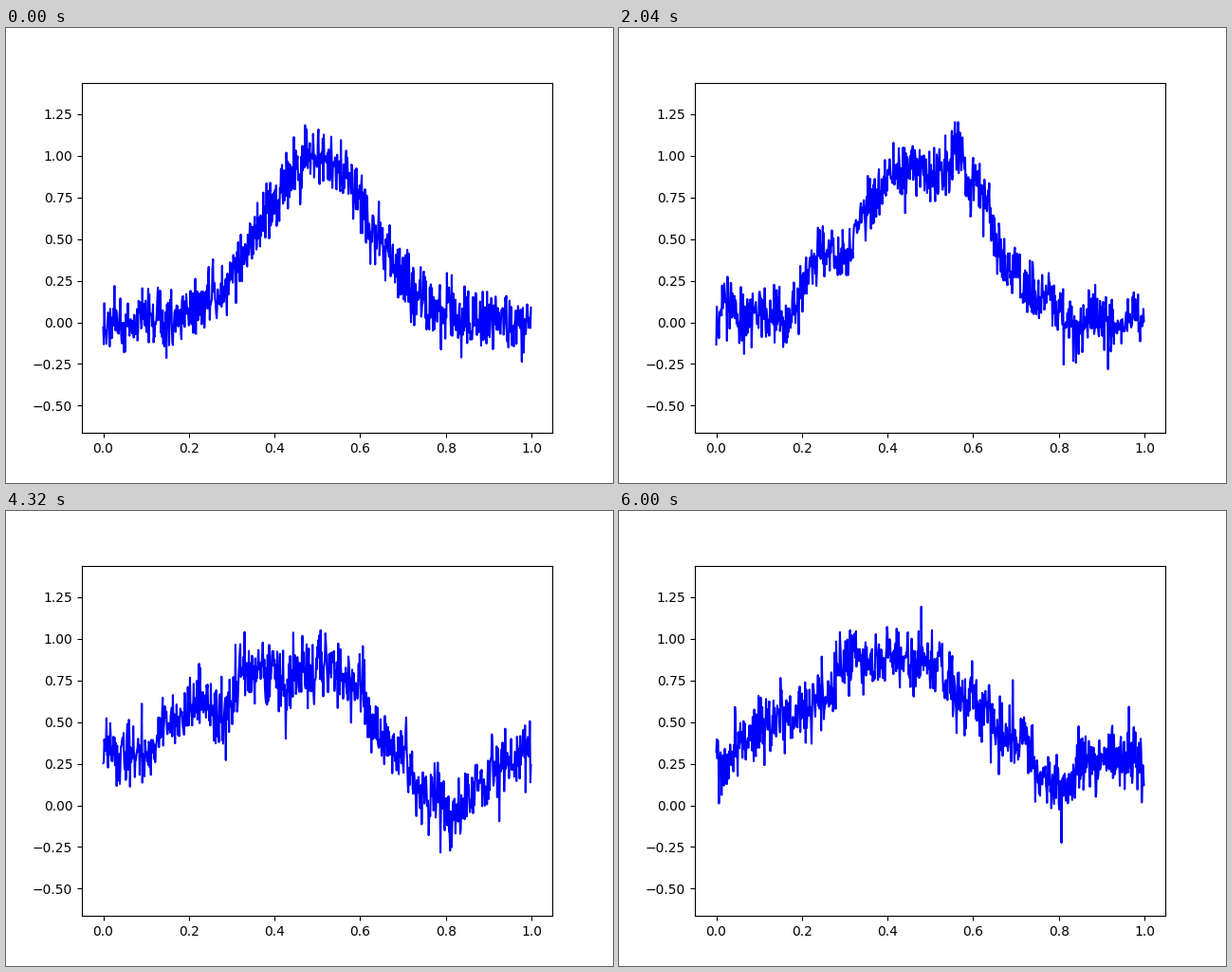
Recreate the animation shown at these times as a matplotlib script. Size 640x480 px, loop 6060 ms.

```python
import numpy as np
import matplotlib.pyplot as plt
from matplotlib.animation import FuncAnimation

FRAMES, STEP_MS, POINTS = 101, 60, 800
SIGMA = 0.125    # width of the starting bell
NOISE = 0.095    # white measurement noise
RIPPLE = 0.12    # strength of the random waves

x = np.arange(POINTS) / POINTS
bell = np.exp(-(x - 0.5) ** 2 / (2 * SIGMA ** 2))


def smooth(t, start, end):
    s = np.clip((t - start) / (end - start), 0, 1)
    return s * s * (3 - 2 * s)


def mean_profile(t):
    """Bell that spreads into a slowly rising, left-leaning wave on a ring."""
    a = 2 * np.pi * x
    lean = smooth(t, 0.2, 0.57)
    level = 0.3 + 0.22 * t
    flatten = 0.48 - 0.21 * smooth(t, 0.34, 0.57)
    wave = (level - flatten * np.cos(a) + 0.22 * lean * np.sin(a)
            + 0.03 * np.cos(2 * a))
    fade = np.exp(-t / 0.08)
    return fade * bell + (1 - fade) * wave


def ripples(rng):
    """Random periodic waves; the shorter ones are weaker and fade faster."""
    k = np.arange(2, 31)
    keep = np.exp(-0.01 * k ** 2)
    kick = RIPPLE / k * np.sqrt(1 - keep ** 2)
    angle = 2 * np.pi * np.outer(k, x)
    c, s = np.zeros((2, k.size))
    rows = []
    for _ in range(FRAMES):
        rows.append(c @ np.cos(angle) + s @ np.sin(angle))
        c = keep * c + kick * rng.normal(size=k.size)
        s = keep * s + kick * rng.normal(size=k.size)
    return np.array(rows)


rng = np.random.default_rng(12)
curves = np.array([mean_profile(n / (FRAMES - 1)) for n in range(FRAMES)])
curves += ripples(rng) + rng.normal(0, NOISE, curves.shape)

fig, ax = plt.subplots(figsize=(6.4, 4.8), dpi=100)
line, = ax.plot(x, curves[0], color="blue", lw=1.5)
ax.set_ylim(-0.664, 1.4395)


def update(n):
    line.set_ydata(curves[n])
    return line,


anim = FuncAnimation(fig, update, frames=FRAMES, interval=STEP_MS,
                     init_func=lambda: update(0), repeat=True, repeat_delay=0)
plt.show()
```
